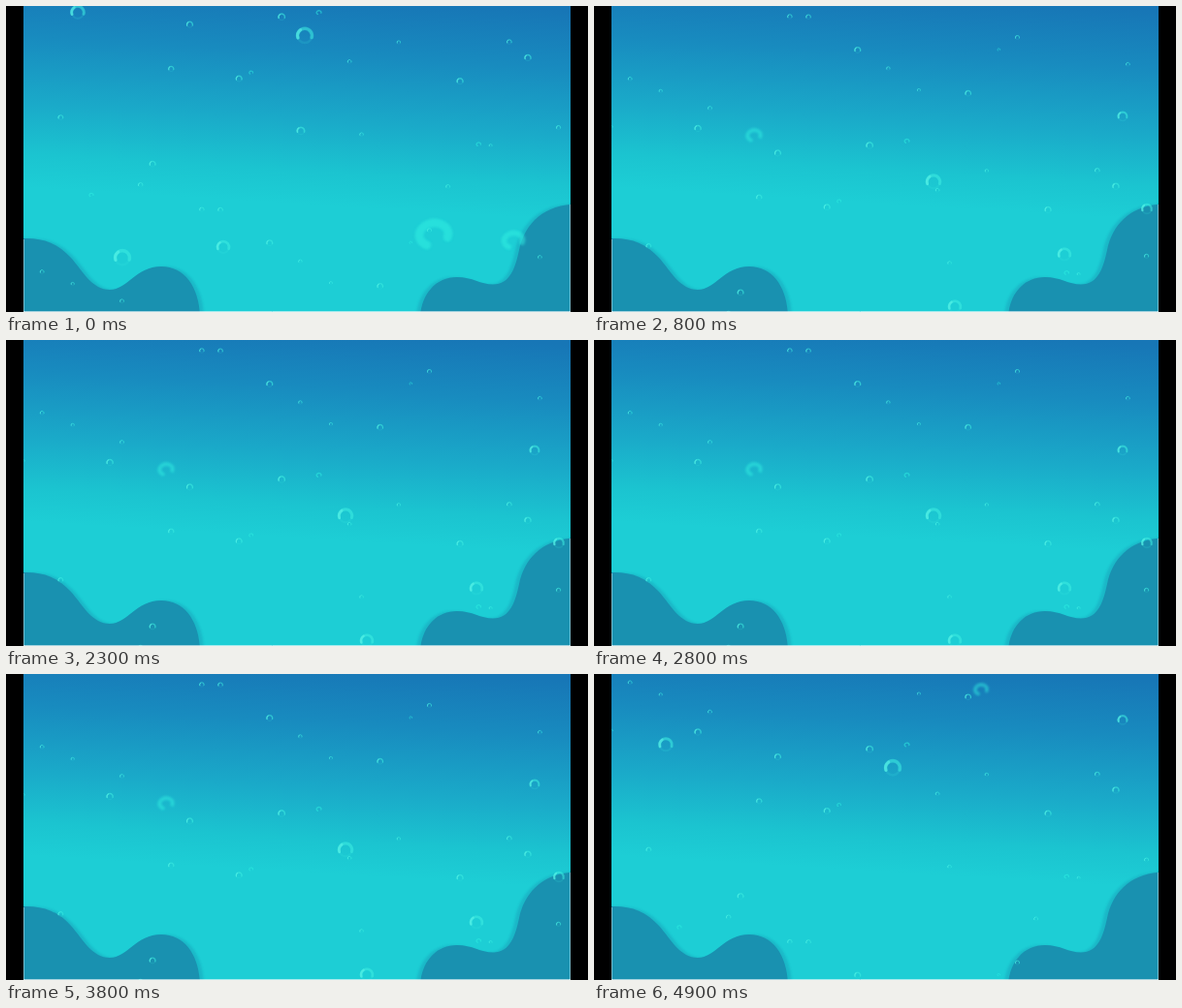
An HTML page that plays this animation: 600 px wide and 316 px high, repeating every 5000 ms.

```html
<!DOCTYPE html>
<html lang="en">
<head>
<meta charset="utf-8">
<title>Bubbles under water</title>
<style>
html, body { margin: 0; width: 100%; height: 100%; overflow: hidden; background: #000; }
svg { display: block; width: 600px; height: 316px; }
</style>
</head>
<body>
<svg viewBox="0 0 600 316">
  <defs>
    <linearGradient id="water" gradientUnits="userSpaceOnUse" x1="308" y1="-12" x2="295" y2="204">
      <stop offset="0" stop-color="#1776b6"/>
      <stop offset=".28" stop-color="#188bbf"/>
      <stop offset=".6" stop-color="#1aaac9"/>
      <stop offset=".84" stop-color="#1bc4d0"/>
      <stop offset="1" stop-color="#1dced5"/>
    </linearGradient>
    <clipPath id="stage"><rect x="18" width="564" height="316"/></clipPath>
    <filter id="soft" x="-30%" y="-30%" width="160%" height="160%"><feGaussianBlur stdDeviation="1.2"/></filter>
    <filter id="shade" x="-10%" y="-10%" width="120%" height="120%"><feGaussianBlur stdDeviation="1.3"/></filter>
    <path id="left" d="M10 240.5C34 238 52 243 67 260C80 275 89 293 107 293C125 293 134 269 160 269C184 269 199 290 200 320H10Z"/>
    <path id="right" d="M427 320C429 297 443 280 465 280C481 280 489 287.5 502 287.5C520 287.5 525 270 529 252C535 224 555 204.5 590 204.5V320Z"/>
  </defs>
  <g clip-path="url(#stage)">
    <rect width="600" height="316" fill="url(#water)"/>
    <g fill="#1991b0" opacity=".35" filter="url(#shade)">
      <use href="#left" x="4"/>
      <use href="#right" x="-4"/>
    </g>
    <g fill="#1991b0">
      <use href="#left"/>
      <use href="#right"/>
    </g>
    <g id="bubbles" fill="none" stroke-linecap="round"></g>
    <path d="M18.5 241V316M581.5 205V316" stroke="#fff" opacity=".4"/>
    <path d="M18 315.5H582" stroke="#fff" opacity=".6"/>
  </g>
</svg>
<script>
const STEP = 100, BEATS = 5, SPAN = 332, RISE = SPAN / BEATS;
const layer = document.getElementById('bubbles');

function seeded(seed) {
  return () => (seed = seed * 16807 % 2147483647) / 2147483647;
}

// A few large bubbles, each seen for two beats: first beat, x, y, radius.
const large = [
  [4, 308, 97, 10], [4, 74, 73, 8.5], [3, 545, 114, 6],
  [0, 120, 260, 10], [0, 224, 249, 8], [0, 304, 129, 5],
  [2, 350, 248, 9], [2, 485, 323, 8], [2, 570, 276, 6.5], [2, 372, 377, 8]
];
const hazy = [[0, 441, 236, 22], [0, 523, 242, 14], [2, 165, 200, 10], [4, 399, 16, 9]];

// Small bubbles spread over the width, rising one full span per loop.
const random = seeded(31);
const small = Array.from({ length: 34 }, (_, i) => ({
  x: 18 + 564 * (i * .618 % 1),
  y: SPAN * random(),
  r: 2 + 2.4 * random(),
  blurred: i % 6 === 0
}));

function arc(r, from, to, h = r) {
  const at = deg => {
    const a = deg * Math.PI / 180;
    return `${(r * Math.cos(a)).toFixed(2)} ${(h * Math.sin(a)).toFixed(2)}`;
  };
  return `M${at(from)}A${r} ${h} 0 ${to - from > 180 ? 1 : 0} 1 ${at(to)}`;
}

function clearBubble(x, y, r) {
  const ring = r * .74;
  return `<g transform="translate(${x} ${y})" stroke="#3eeee2">
    <circle r="${ring}" stroke-width="${r * .25}" opacity=".15"/>
    <path d="${arc(ring, 165, 375)}" stroke-width="${r * .36}" opacity=".5"/>
    <path d="${arc(ring, 160, 235)}" stroke="#62f6ea" stroke-width="${r * .3}" opacity=".5"/>
  </g>`;
}

function hazyBubble(x, y, w) {
  const h = w * .8;
  return `<g transform="translate(${x} ${y}) rotate(-8)" stroke="#30f2e4"${w > 5 ? ' filter="url(#soft)"' : ''}>
    <path d="${arc(w * .68, 125, 385, h * .68)}" stroke-width="${h * .5}" opacity=".5"/>
  </g>`;
}

function sightings(list, beat, paint) {
  return list.map(([born, x, y, r]) => {
    const age = (beat - born + BEATS) % BEATS;
    return age < 2 ? paint(x, y - age * RISE, r) : '';
  }).join('');
}

function drift(beat) {
  return small.map(({ x, y, r, blurred }) => {
    const height = (y - beat * RISE + SPAN) % SPAN - 8;
    return (blurred ? hazyBubble : clearBubble)(x, height, r);
  }).join('');
}

let shown = -1;
function draw(time) {
  const beat = Math.floor(time / STEP) % BEATS;
  if (beat === shown) return;
  shown = beat;
  layer.innerHTML = drift(beat) + sightings(hazy, beat, hazyBubble) + sightings(large, beat, clearBubble);
}

const start = performance.now();
function tick() {
  draw((performance.now() - start) % 5000);
  requestAnimationFrame(tick);
}
tick();
</script>
</body>
</html>
```
